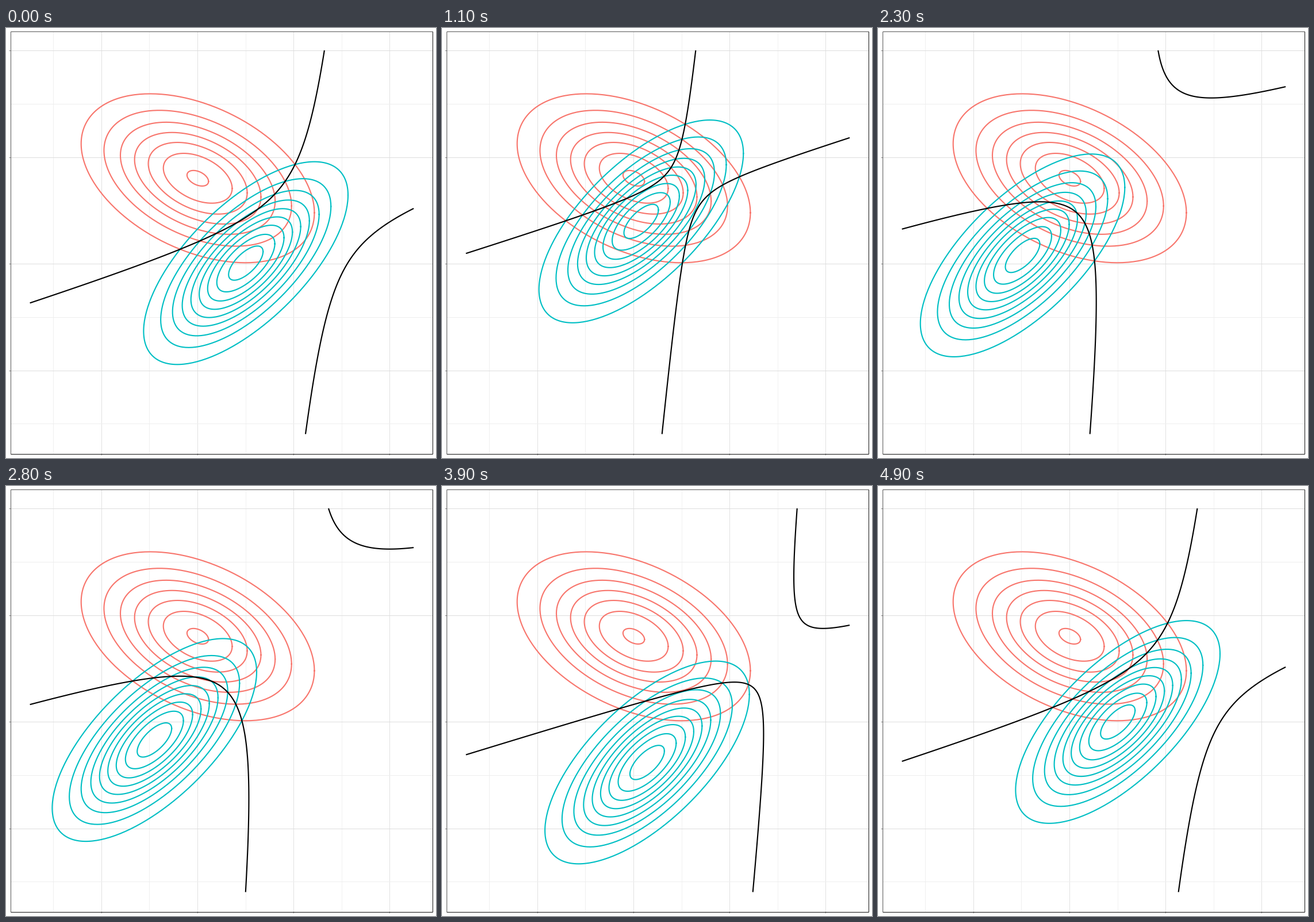
These frames come from a looping animation (748x748 px, 5000 ms). A matplotlib script:

```python
import numpy as np
import matplotlib.pyplot as plt
from matplotlib.animation import FuncAnimation

SIZE, DPI = 748, 64
PX = 72 / DPI                                  # one pixel in points
FRAMES, INTERVAL = 50, 100
LEFT, RIGHT, TOP, BOTTOM = 8.25, 742.5, 5.5, 739.75
PAD = (RIGHT - LEFT) / 22
X_UNIT, Y_UNIT = 83.6, (BOTTOM - TOP) / 9.9
X_ZERO, Y_ZERO = 333.57, TOP + PAD + 5 * Y_UNIT
LINE = 2.13 * PX

RED_MEAN = np.array([0.0, 2.0])
RED_COV = np.array([[1.5, -0.5], [-0.5, 1.0]])
BLUE_COV = np.array([[1.0, 0.75], [0.75, 1.25]])

fig = plt.figure(figsize=(SIZE / DPI, SIZE / DPI), dpi=DPI, facecolor="white")
ax = fig.add_axes([0, 0, 1, 1])
ax.set(xlim=(0, SIZE), ylim=(SIZE, 0))
ax.axis("off")


def to_px(x, y):
    return X_ZERO + X_UNIT * x, Y_ZERO - Y_UNIT * y


def rule(xs, ys, color, z):
    """Draw a crisp one-pixel line."""
    ax.plot(xs, ys, color=color, lw=PX, zorder=z, snap=True,
            solid_capstyle="butt")


def draw_panel():
    for x in range(-3, 5):
        px = int(to_px(x, 0)[0]) + 0.5
        major = x % 2 == 0
        rule([px, px], [TOP, BOTTOM], "#e0e0e0" if major else "#f0f0f0", 1)
        if major:
            rule([px, px], [BOTTOM, BOTTOM + 2.75], "#888888", 1)
    for y in (-3.75, -2.5, -1.25, 0, 2.5, 3.75, 5):
        py = int(to_px(0, y)[1]) + 0.5
        major = y % 2.5 == 0
        rule([LEFT, RIGHT], [py, py], "#dddddd" if major else "#eeeeee", 1)
        if major:
            rule([LEFT - 2.75, LEFT], [py, py], "#888888", 1)
    l, r, t, b = 8.5, 742.5, 5.5, 740.5
    rule([l, l], [t, b], "#555555", 8)
    rule([l, r], [t, t], "#555555", 8)
    rule([r, r], [t, b + 0.5], "#111111", 8)
    rule([l, r], [b, b], "#111111", 8)


def density_rings(cov, step=0.02):
    """Offsets from the mean of the contours at multiples of step."""
    peak = 1 / (2 * np.pi * np.sqrt(np.linalg.det(cov)))
    angle = np.linspace(0, 2 * np.pi, 241)
    circle = np.linalg.cholesky(cov) @ np.array([np.cos(angle), np.sin(angle)])
    levels = np.arange(step, peak, step)
    return [np.sqrt(2 * np.log(peak / level)) * circle for level in levels]


def score(x, y, mean, cov):
    """Minus twice the log density, without the shared constant."""
    inv = np.linalg.inv(cov)
    dx, dy = x - mean[0], y - mean[1]
    return (inv[0, 0] * dx**2 + 2 * inv[0, 1] * dx * dy + inv[1, 1] * dy**2
            + np.log(np.linalg.det(cov)))


draw_panel()
for ring in density_rings(RED_COV):
    ax.plot(*to_px(*(ring + RED_MEAN[:, None])), color="#F8766D", lw=LINE,
            zorder=3)

blue_rings = density_rings(BLUE_COV)
blue_lines = [ax.plot([], [], color="#00BFC4", lw=LINE, zorder=4)[0]
              for _ in blue_rings]

grid_px = np.meshgrid(np.linspace(LEFT + PAD, RIGHT - PAD, 201),
                      np.linspace(TOP + PAD, BOTTOM - PAD, 201))
grid_x = (grid_px[0] - X_ZERO) / X_UNIT
grid_y = (Y_ZERO - grid_px[1]) / Y_UNIT
red_score = score(grid_x, grid_y, RED_MEAN, RED_COV)
boundary = []


def update(i):
    theta = 0.01 + i * (2 * np.pi - 0.02) / (FRAMES - 1)
    mean = np.array([np.cos(theta), np.sin(theta)])
    for line, ring in zip(blue_lines, blue_rings):
        line.set_data(*to_px(*(ring + mean[:, None])))
    while boundary:
        boundary.pop().remove()
    gap = red_score - score(grid_x, grid_y, mean, BLUE_COV)
    boundary.append(ax.contour(*grid_px, gap, levels=[0], colors="black",
                               linewidths=LINE, zorder=5))
    ax.set(xlim=(0, SIZE), ylim=(SIZE, 0))
    return blue_lines


animation = FuncAnimation(fig, update, frames=FRAMES, interval=INTERVAL,
                          repeat=True, repeat_delay=0, blit=False)
plt.show()
```
